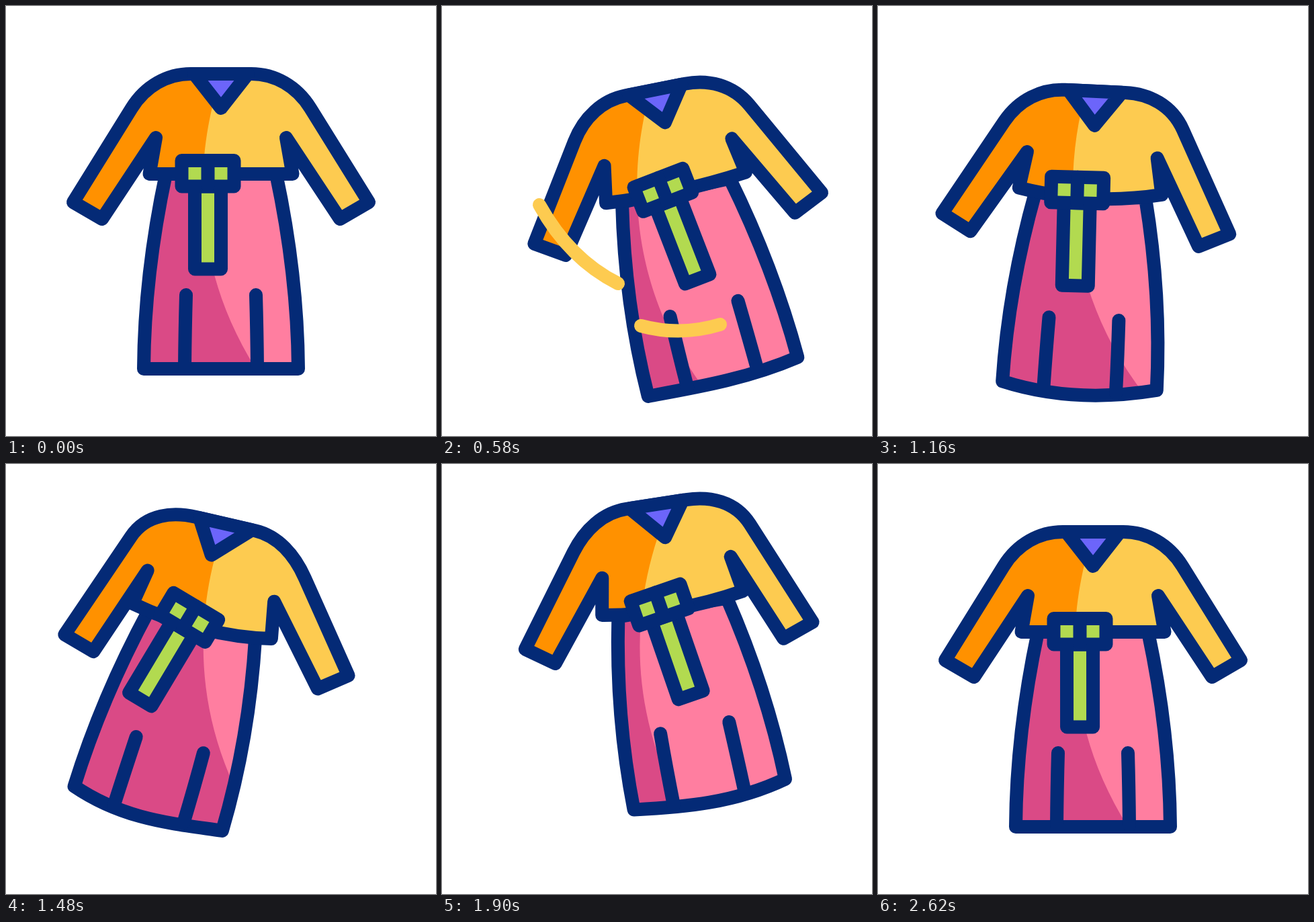
Recreate the animation shown at these times as an HTML page with a canvas. Size 640 by 640 pixels, loop 3000 ms.

```html
<!DOCTYPE html>
<html lang="en">
<head>
<meta charset="utf-8">
<title>Swinging dress</title>
<style>
  html, body { margin: 0; width: 100%; height: 100%; overflow: hidden; background: #fff; }
  canvas { display: block; width: 640px; height: 640px; }
</style>
</head>
<body>
<canvas id="stage" width="640" height="640"></canvas>
<script>
const ctx = document.getElementById('stage').getContext('2d');
const LOOP = 3000, BEGIN = 210, END = 2620;
const NAVY = '#042a76', ORANGE = '#ff9100', YELLOW = '#fdcb50';
const PINK = '#ff7ea0', ROSE = '#da4a86', GREEN = '#b2da50', PURPLE = '#6c65fa';
const NECK = 101, WAIST = 149, HEM = 439;

const rad = deg => deg * Math.PI / 180;
const clamp = x => Math.min(1, Math.max(0, x));
const ease = x => (1 - Math.cos(Math.PI * clamp(x))) / 2;

// Eases through turning points given as [time, value].
const through = points => t => points.slice(1).reduce(
  (sum, [time, value], i) => sum + (value - points[i][1]) * ease((t - points[i][0]) / (time - points[i][0])),
  points[0][1]
);

const swingAt = through([[BEGIN, 0], [810, -19.5], [1420, 17], [1810, -13], [2200, 7], [2440, -1], [END, 0]]);
const heightAt = through([[230, NECK], [870, 142], [1900, 60], [END, NECK]]);

// All secondary motion follows from the swing: the belt trails it, the arms lead it.
function poseAt(t) {
  const tilt = swingAt(t), trail = swingAt(t - 20), arm = 0.5 * swingAt(t + 90);
  const sag = 13.5 * Math.sin(Math.PI * clamp((t - BEGIN) / (END - BEGIN)));
  return {
    tilt, arm, sag,
    x: 320 + 0.3 * tilt + 0.18 * sag,
    y: heightAt(t),
    droop: 0.25 * sag,
    skew: tilt / 36,
    belt: trail * (1.1 + 0.05 * Math.abs(trail))
  };
}

let pose;

// Body space: u across from the middle, v down from the neckline.
function pt(u, v, drop = 0) {
  const k = v / HEM;
  const axis = rad(pose.tilt * (0.85 + 0.15 * k));
  const side = rad(pose.tilt * (0.85 + 0.25 * k));
  return [
    pose.x - v * Math.sin(axis) + u * Math.cos(side),
    pose.y + v * Math.cos(axis) + u * Math.sin(side) + drop
  ];
}

function offset([x, y], u, v, deg) {
  const c = Math.cos(rad(deg)), s = Math.sin(rad(deg));
  return [x + u * c - v * s, y + u * s + v * c];
}

function sagAt(u) {
  const k = u / 115;
  return pose.sag * (1 - k * k) * (1 - pose.skew * k);
}

const move = (p, a) => p.moveTo(...a);
const line = (p, ...pts) => pts.forEach(a => p.lineTo(...a));
const quad = (p, a, b) => p.quadraticCurveTo(...a, ...b);
const cubic = (p, a, b, c) => p.bezierCurveTo(...a, ...b, ...c);

function stroke(p, color = NAVY) {
  ctx.strokeStyle = color;
  ctx.stroke(p);
}

function paint(p, fill) {
  ctx.fillStyle = fill;
  ctx.fill(p);
  stroke(p);
}

// Fills a shape in its light tone with the dark tone left of the shade edge.
function paintShaded(p, light, dark) {
  ctx.fillStyle = light;
  ctx.fill(p);
  ctx.save();
  ctx.clip(p);
  const dy = pose.y - NECK;
  ctx.translate(305, 310 + dy);
  ctx.rotate(rad(-0.12 * dy));
  ctx.translate(-305, -310);
  ctx.beginPath();
  ctx.moveTo(-200, -100);
  ctx.lineTo(370, -20);
  ctx.lineTo(325, 90);
  ctx.bezierCurveTo(285, 200, 265, 370, 372, 540);
  ctx.lineTo(430, 625);
  ctx.lineTo(-200, 800);
  ctx.fillStyle = dark;
  ctx.fill();
  ctx.restore();
  stroke(p);
}

function drawSkirt() {
  const p = new Path2D(), hem = 1.46 * pose.sag, top = sagAt(82);
  move(p, pt(-82, WAIST, top));
  quad(p, pt(-114, 299), pt(-115, HEM));
  cubic(p, pt(-38, HEM, hem * (1 + pose.skew)), pt(38, HEM, hem * (1 - pose.skew)), pt(115, HEM));
  quad(p, pt(114, 299), pt(82, WAIST, top));
  p.closePath();
  paintShaded(p, PINK, ROSE);
  for (const s of [-1, 1]) {
    const slit = new Path2D(), drop = sagAt(52 * s);
    move(slit, pt(52 * s, 329, drop));
    quad(slit, pt(53.5 * s, 380, drop), pt(54 * s, 437, drop));
    stroke(slit);
  }
}

function sleeve(s) {
  const angle = pose.arm + s * pose.droop;
  const pit = pt(97 * s, 95), elbow = pt(133 * s, 51);
  const cuff = offset(pit, 123 * s, 96, angle), inner = offset(pit, 80 * s, 121, angle);
  const lead = elbow.map((n, i) => n + (n - cuff[i]) * 0.235);
  return { pit, elbow, cuff, inner, lead };
}

function drawBodice() {
  const l = sleeve(-1), r = sleeve(1);
  const p = new Path2D(), drop = 1.13 * pose.sag;
  move(p, pt(-45, 0));
  cubic(p, pt(-80, 0), l.lead, l.elbow);
  line(p, l.cuff, l.inner, l.pit, pt(-106.5, WAIST));
  cubic(p, pt(-36, WAIST, drop), pt(36, WAIST, drop), pt(106.5, WAIST));
  line(p, r.pit, r.inner, r.cuff, r.elbow);
  cubic(p, r.lead, pt(80, 0), pt(45, 0));
  p.closePath();
  paintShaded(p, YELLOW, ORANGE);

  const collar = new Path2D();
  move(collar, pt(-40, 0));
  line(collar, offset(pt(0, 0), 0, 51, 0.8 * pose.belt), pt(40, 0));
  collar.closePath();
  paint(collar, PURPLE);
}

function drawBelt() {
  ctx.save();
  ctx.translate(...pt(-19.5, 148));
  ctx.rotate(rad(pose.belt));
  const strap = new Path2D(), band = new Path2D(), knot = new Path2D();
  strap.rect(-19.5, 19.5, 39, 123);
  band.rect(-39, -19, 78, 38.5);
  knot.moveTo(0, -19);
  knot.lineTo(0, 19);
  paint(strap, GREEN);
  paint(band, GREEN);
  stroke(knot);
  ctx.restore();
}

// Each streak grows from its tail, then shrinks toward its head.
function drawStreak(t, a, b, c, length) {
  const tail = ease((t - 590) / 160), head = ease((t - 400) / 180);
  if (head - tail < 0.01) return;
  const p = new Path2D();
  move(p, a);
  quad(p, b, c);
  ctx.save();
  ctx.setLineDash([(head - tail) * length, 1000]);
  ctx.lineDashOffset = -tail * length;
  stroke(p, YELLOW);
  ctx.restore();
}

function draw(t) {
  pose = poseAt(t);
  ctx.fillStyle = '#fff';
  ctx.fillRect(0, 0, 640, 640);
  ctx.lineWidth = 20;
  ctx.lineCap = ctx.lineJoin = 'round';
  drawSkirt();
  drawBodice();
  drawBelt();
  drawStreak(t, [145, 296], [190, 377], [262, 413], 172);
  drawStreak(t, [296, 476], [355, 492], [414, 474], 122);
}

const start = performance.now();
function tick() {
  draw((performance.now() - start) % LOOP);
  requestAnimationFrame(tick);
}
tick();
</script>
</body>
</html>
```
